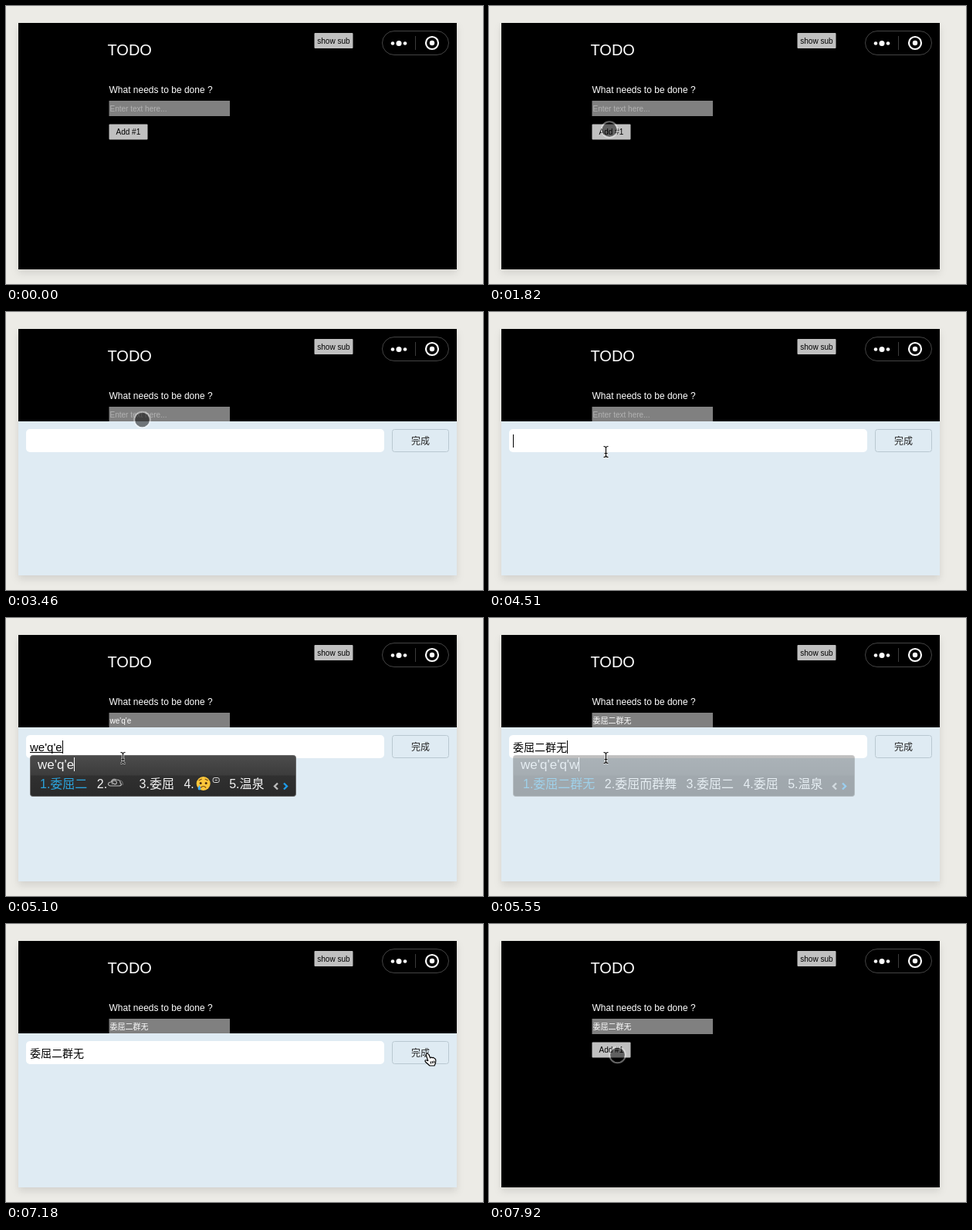
Write an HTML page that moves like this. It is 618 px wide and 361 px high and loops after 8000 ms.

```html
<!DOCTYPE html>
<html lang="en">
<head>
<meta charset="utf-8">
<title>Todo input</title>
<style>
html, body { margin: 0; width: 100%; height: 100%; overflow: hidden; background: #ecebe6; }
svg { display: block; font: 10px "Liberation Sans", "Noto Sans CJK SC", "Noto Sans CJK", sans-serif; }
#device { filter: drop-shadow(0 5px 5px rgba(0, 0, 0, .1)); }
</style>
</head>
<body>
<svg width="618" height="361" viewBox="0 0 618 361">
  <defs>
    <linearGradient id="shade" x2="0" y2="1">
      <stop stop-color="#4c4c4c"/><stop offset=".48" stop-color="#3c3c3c"/>
      <stop offset=".5" stop-color="#303030"/><stop offset="1" stop-color="#2a2a2a"/>
    </linearGradient>
    <g id="ring">
      <circle r="9.5" fill="#000" fill-opacity=".5"/>
      <circle r="10.3" fill="none" stroke="#fff" stroke-opacity=".4" stroke-width="2"/>
    </g>
    <g id="beam" fill="none">
      <path id="stem" d="M-3-7Q0-7 0-5Q0-7 3-7M0-5V5M-3 7Q0 7 0 5Q0 7 3 7M-2 2H2" stroke="#fff" stroke-width="2.6"/>
      <path d="M-3-7Q0-7 0-5Q0-7 3-7M0-5V5M-3 7Q0 7 0 5Q0 7 3 7M-2 2H2" stroke="#000" stroke-width="1.1"/>
    </g>
    <path id="arrow" d="M0 0V14L3.4 11L5.6 16L7.8 15L5.7 10.4H10Z" stroke="#fff"/>
    <path id="hand" d="M-2 1.5Q0-1 1.8 1.5L3.6 6Q5 4.5 6.4 5.8Q8 4.8 9 6.8Q10.6 6.4 10.8 9L10.4 13L9 16H3L-2.6 11Q-4 8-1 9L.8 9.6ZM4 10.5L4.6 13.5M6.2 10L6.8 13M8.4 9.6L8.8 12.5" fill="#fff" stroke="#000" stroke-width="1.2" stroke-linejoin="round"/>
  </defs>

  <rect id="device" x="16" y="22" width="568" height="320"/>
  <text x="131.5" y="64" font-size="20" fill="#fff">TODO</text>
  <text x="133.5" y="112.5" font-size="12" fill="#fff">What needs to be done ?</text>
  <rect x="133.5" y="123" width="156.5" height="20" fill="#808080"/>
  <text id="field" x="134.5" y="136.5"></text>
  <g fill="#c0c0c0">
    <rect x="133.5" y="153.5" width="50" height="20" rx="1"/>
    <rect x="399.5" y="35" width="50" height="20" rx="1"/>
  </g>
  <text x="142.5" y="167">Add #1</text>
  <text x="403.3" y="48.5">show sub</text>
  <rect x="487.5" y="32.5" width="86" height="31" rx="15.5" fill="none" stroke="#444"/>
  <path d="M530.5 39V57" stroke="#3c3c3c"/>
  <g fill="#fff">
    <circle cx="501" cy="48.5" r="2.3"/><circle cx="509" cy="48.5" r="3.5"/><circle cx="517" cy="48.5" r="2.3"/>
    <circle cx="552" cy="48" r="3.2"/>
  </g>
  <circle cx="552" cy="48" r="8" fill="none" stroke="#fff" stroke-width="2.2"/>

  <g id="panel">
    <rect x="16" y="142" width="568" height="200" fill="#dfebf3"/>
    <rect x="26" y="152" width="464" height="30" rx="5" fill="#fff"/>
    <rect x="500.5" y="152.5" width="73" height="29" rx="3" fill="none" stroke="#b9c8d1"/>
    <text x="525" y="171.5" font-size="12" fill="#222">完成</text>
    <text id="entry" x="31" y="172.5"></text>
    <rect id="underline" x="31" y="174" height="1"/>
    <rect id="caret" y="159" width="1" height="17"/>
    <g id="popup"></g>
  </g>
  <use id="cursor"/>
</svg>
<script>
const LOOP = 8000, OPEN = 3460, CLOSE = 7320, COMMIT = 5550, DONE = '委屈二群无';
const $ = id => document.getElementById(id);

// time, shape, x, y
const moves = [
  [500, 'ring', 183, 53], [650, 'ring', 176, 88], [800, 'ring', 163, 120], [950, 'beam', 162, 137],
  [1670, 'ring', 162, 152], [1820, 'ring', 156, 160.5],
  [3010, 'ring', 168, 151], [3160, 'ring', 176.5, 140],
  [3910, 'ring', 184, 140], [4060, 'beam', 151.5, 181.5],
  [5850, 'arrow', 250, 200], [6000, 'arrow', 430, 205], [6150, 'arrow', 545, 165], [6280, 'ring', 566.5, 132],
  [6430, 'arrow', 565, 146], [6580, 'hand', 559, 160], [6730, 'hand', 554, 166], [6880, 'hand', 551, 167],
  [7030, 'hand', 549, 168], [7180, 'hand', 546, 168],
  [7320, 'ring', 540, 172], [7470, 'ring', 440, 184], [7620, 'ring', 310, 184], [7770, 'ring', 205, 176],
  [7920, 'ring', 166.5, 170]
];

// time, letters typed, candidates (* = cloud, ! = crying face)
const keys = [
  [4800, 'w', ['我', '无', '为', '问', '玩']],
  [4950, "we'q", ['委屈', '温泉', '尾气', '*', '文区']],
  [5100, "we'q'e", ['委屈二', '*', '委屈', '!', '温泉']],
  [5250, "we'q'e'q", ['委屈二群', '委屈二', '委屈', '!', '温泉']],
  [5400, "we'q'e'q'w", [DONE, '委屈而群舞', '委屈二', '委屈', '温泉']]
];

const latest = (list, t) => list.filter(item => item[0] <= t).pop();

const icons = {
  '*': [29, x => `<path d="M${x + 4} 218q-4-1-2-4q2-1 3-1q2-5 7-3q5 0 5 4q3 3-1 4zm3-2q-2-4 2-5q4 0 3 4q-3 2-4-1" fill="none" stroke="#bbb" stroke-width="1.2"/>
    <path d="M${x + 16} 211q5 0 4 6" fill="none" stroke="#777"/>`],
  '!': [33, x => `<g transform="translate(${x + 12} 215)"><circle r="9" fill="#fbc73a"/>
    <path d="M-6-4l4-2M6-4l-4-2M-3.5 5.5q3.5-4 7 0" fill="none" stroke="#7a4a12" stroke-width="1.2"/>
    <circle cx="-3.5" cy="-.5" r="1.5" fill="#4a2c10"/><circle cx="3.5" cy="-.5" r="1.5" fill="#4a2c10"/>
    <path d="M-5 2q-4 6 0 6.500q3-.5 0-6.500" fill="#3fa9f5"/></g>
    <rect x="${x + 24.500}" y="207.500" width="8" height="6" rx="2" fill="none" stroke="#ddd"/><path d="M${x + 27} 210.500h3" stroke="#ddd"/>`]
};

function popup(typed, words) {
  let x = 44, row = '';
  words.forEach((word, i) => {
    const icon = icons[word];
    row += `<text x="${x}" y="220.5" font-size="16" fill="${i ? '#f2f2f2' : '#2ba3dc'}">${i + 1}.${icon ? '' : word}</text>`;
    x += 13.3;
    if (icon) row += icon[1](x);
    x += (icon ? icon[0] : word.length * 16) + 12.5;
  });
  const chevron = (dx, color, d) => `<path d="M${x + dx} 214.500l${d} 4l${-d} 4" fill="none" stroke="${color}" stroke-width="2.4"/>`;
  $('popup').innerHTML = `<rect x="31.5" y="178.5" width="${x - 2}" height="53" rx="3" fill="url(#shade)" stroke="#666"/>
    <text id="typed" x="41" y="196" font-size="17" fill="#f2f2f2">${typed}</text>${row}
    ${chevron(5, '#bbb', -4)}${chevron(13, '#1e9be8', 4)}`;
  $('popup').querySelector('rect').setAttribute('width', x - 1 - 1 + 30 - 31);
  const end = 41 + $('typed').getComputedTextLength();
  $('popup').innerHTML += `<rect x="${Math.round(end)}" y="181" width="1" height="18" fill="#fff"/>`;
}

function set(id, attrs) {
  for (const name in attrs) $(id).setAttribute(name, attrs[name]);
}

let shown;
function draw(t) {
  const key = t < COMMIT && latest(keys, t);
  const committed = t >= COMMIT;
  const value = committed ? DONE : key ? key[1] : '';

  $('field').textContent = value || 'Enter text here...';
  set('field', { fill: value ? '#fff' : '#b2b2b2' });
  set('panel', { display: t >= OPEN && t < CLOSE ? 'inline' : 'none' });

  $('entry').textContent = value;
  set('entry', { 'font-size': committed ? 14 : 15 });
  const width = value && t >= OPEN && t < CLOSE ? Math.round($('entry').getComputedTextLength()) : 0;
  set('underline', { width: key ? width : 0 });
  set('caret', { x: 31 + width, opacity: t >= 4510 && t < 5850 ? 1 : 0 });

  if (key && key !== shown) popup(key[1], key[2]);
  if (key) shown = key;
  set('popup', { opacity: key ? 1 : committed && t < 5700 ? .35 : 0 });

  const move = latest(moves, t);
  set('cursor', move
    ? { href: '#' + move[1], x: move[2], y: move[3], opacity: 1 }
    : { opacity: 0 });
}

const start = performance.now();
function tick() {
  draw((performance.now() - start) % LOOP);
  requestAnimationFrame(tick);
}
tick();
</script>
</body>
</html>
```
